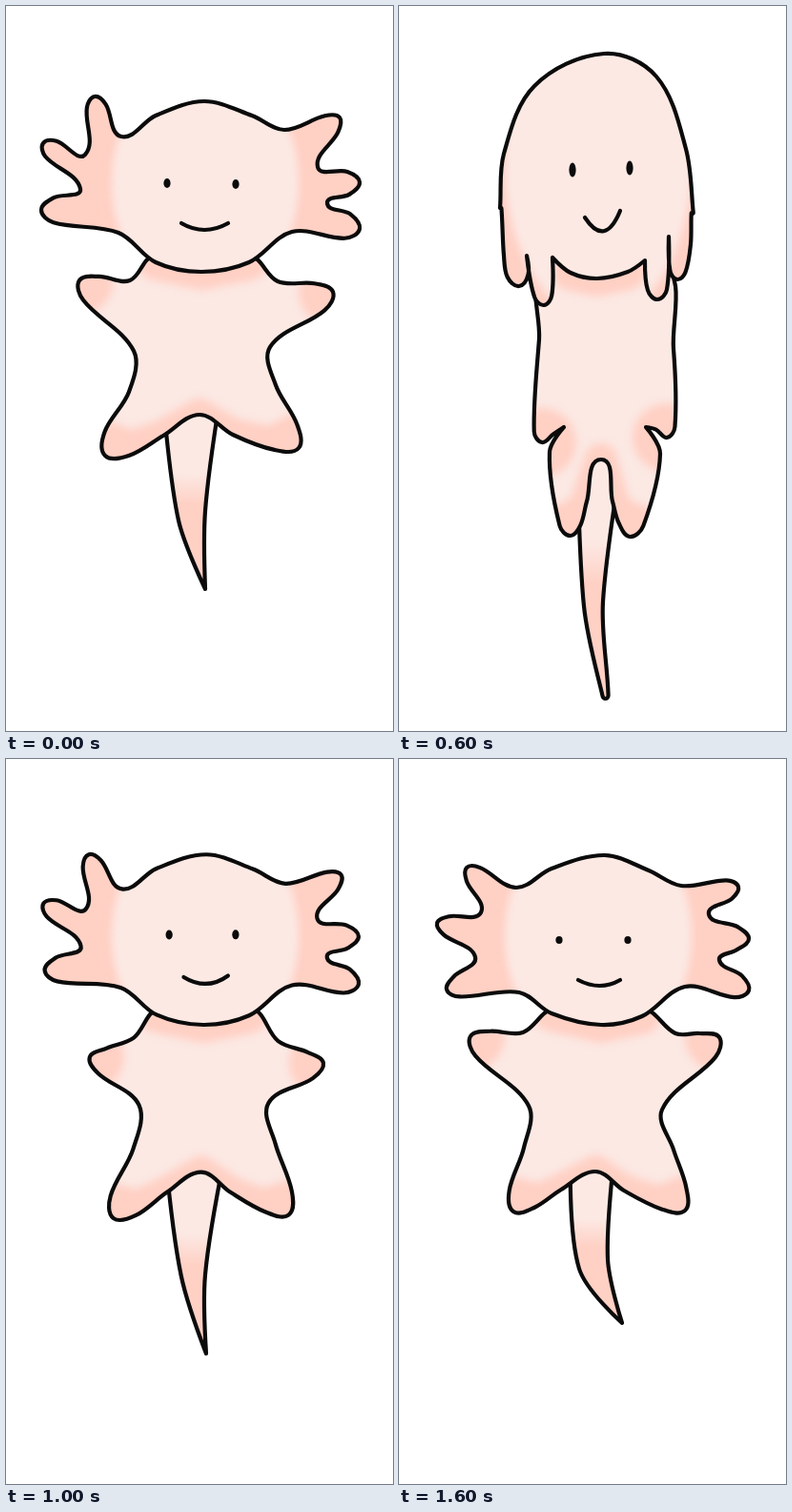
Write an HTML page with a canvas that moves like this. It is 406 by 761 pixels and loops after 1.8 s.

```html
<!DOCTYPE html>
<html lang="en">
<head>
<meta charset="utf-8">
<title>Stretching axolotl</title>
<style>
  html, body { margin: 0; width: 100%; height: 100%; overflow: hidden; background: #fff; }
  canvas { display: block; }
</style>
</head>
<body>
<canvas width="406" height="761"></canvas>
<script>
const ctx = document.querySelector('canvas').getContext('2d');
const INK = '#0b0b0b', SKIN = '#fce9e4', BLUSH = '#ffd0c4';
const HOLD = 200;

// Outlines run clockwise. [x, y] is a smooth knot, [x, y, r] a fingertip
// rounded with radius r, [x, y, 0] a sharp corner.
// head: top, brow, valley, three fingers, jaw, chin, and back up the left side
// body: neck, shoulder, hand, armpit, waist, foot, thigh, crotch, and back up
const relaxed = {
  head: [[208,100], [258,115], [292,130], [350,117,11], [327,169], [371,185,12], [337,207], [371,234,13],
    [300,237], [255,269], [205,279], [157,269], [118,238],
    [37,214,13], [78,192], [39,144,10], [83,156], [93,95,10], [121,137], [157,115]],
  body: [[256,262], [285,289], [343,300,15], [277,358], [283,398], [307,464,18], [238,450], [203,429],
    [165,451], [104,472,18], [129,405], [134,362], [77,288,15], [130,288], [155,262]],
  tail: [[224,415,0], [209,530], [209,612,0], [181,540], [165,415,0]],
  eyes: [[169,186], [241,187]], eyeHeight: 5,
  mouth: [[184,228], [208,242], [233,228]]
};

const squashed = {
  head: [[216,101], [262,117], [296,133], [356,134,10], [325,163], [367,189,12], [336,211], [367,243,12],
    [300,239], [255,270], [212,279], [160,267], [126,245],
    [50,242,11], [80,208], [40,172,10], [86,161], [71,114,10], [123,135], [160,115]],
  body: [[257,262], [290,288], [336,292,15], [276,368], [288,410], [300,474,17], [236,453], [206,433],
    [170,452], [120,475,16], [131,408], [136,364], [75,291,15], [130,287], [162,262]],
  tail: [[226,415,0], [219,525], [234,592,0], [189,535], [180,415,0]],
  eyes: [[168,190], [240,190]], eyeHeight: 4,
  mouth: [[188,232], [211,244], [232,232]]
};

const stretched = {
  head: [[217,72], [280,94], [306,131], [344,198,10], [311,183], [336,240,10], [301,220], [303,273,8],
    [285,248], [258,264], [212,277], [165,272], [150,264],
    [136,285,6], [127,249], [98,274,7], [111,214], [72,250,8], [112,152], [140,100]],
  body: [[262,260], [285,318], [306,380,10], [271,366,0], [279,415], [268,518,17], [229,468], [208,446],
    [178,466], [132,511,14], [146,420], [155,366,0], [121,387,10], [146,307], [172,262]],
  tail: [[243,435,0], [209,575], [213,661,0], [192,550], [175,435,0]],
  eyes: [[178,178], [241,175]], eyeHeight: 5.5,
  mouth: [[194,225], [217,250], [232,219]]
};

const longest = {
  head: [[215,50], [270,74], [301,150], [308,218,1], [306,250], [292,287,8], [283,242,0], [271,308,10],
    [258,267,0], [240,279], [208,286], [180,280], [161,264,0],
    [152,314,9], [134,262,0], [126,294,11], [110,262], [106,212,1], [110,155], [142,84]],
  body: [[276,268], [288,360], [281,453,10], [259,442,0], [274,470], [242,557,13], [224,520], [212,476],
    [197,520], [180,556,11], [158,468], [173,442,0], [150,458,10], [147,350], [155,268]],
  tail: [[236,460,0], [214,625], [217,727,3], [194,630], [187,460,0]],
  eyes: [[182,172], [242,170]], eyeHeight: 7.5,
  mouth: [[195,222], [216,254], [232,215]]
};

// Blends numbers, lists or whole poses
function mix(a, b, k) {
  if (typeof a === 'number') return a + (b - a) * k;
  if (Array.isArray(a)) return a.map((v, i) => mix(v, b[i], k));
  return Object.fromEntries(Object.keys(a).map(key => [key, mix(a[key], b[key], k)]));
}

const settled = { ...mix(relaxed, squashed, .15), head: mix(relaxed.head, squashed.head, .55), tail: relaxed.tail };
const returning = {
  ...stretched,
  head: stretched.head.map(([x, y, ...r]) => [x - 1.5, y - 2.5, ...r]),
  mouth: [[192,230], [217,248], [233,224]]
};

const poses = [
  relaxed,
  stretched,
  { ...mix(stretched, longest, .65), head: mix(stretched.head, longest.head, .85) },
  longest,
  returning,
  { ...mix(settled, returning, .25), head: mix(relaxed.head, settled.head, .5) },
  settled,
  mix(settled, squashed, .7),
  squashed
];

// Expands a fingertip into three knots around its rounded end
function roundTip([x, y, r], before, after) {
  const dx = x - (before[0] + after[0]) / 2, dy = y - (before[1] + after[1]) / 2;
  const len = Math.hypot(dx, dy), u = dx / len * r, v = dy / len * r;
  return [[x - u + v, y - v - u], [x, y], [x - u - v, y - v + u]];
}

function outline(points) {
  const near = (list, i) => list[(i + list.length) % list.length];
  const knots = points.flatMap((p, i) =>
    p[2] > 0 ? roundTip(p, near(points, i - 1), near(points, i + 1)) : [p]);
  const heading = i => {
    if (knots[i].length > 2) return [0, 0];
    const [ax, ay] = near(knots, i - 1), [bx, by] = near(knots, i + 1);
    const len = Math.hypot(bx - ax, by - ay) || 1;
    return [(bx - ax) / len, (by - ay) / len];
  };
  const path = new Path2D();
  path.moveTo(...knots[0]);
  knots.forEach(([x, y], i) => {
    const j = (i + 1) % knots.length, [ex, ey] = knots[j];
    const [ux, uy] = heading(i), [vx, vy] = heading(j);
    const reach = Math.hypot(ex - x, ey - y) / 3;
    path.bezierCurveTo(x + ux * reach, y + uy * reach, ex - vx * reach, ey - vy * reach, ex, ey);
  });
  path.closePath();
  return path;
}

function part(points, fill, shade = () => {}) {
  const path = outline(points);
  ctx.fillStyle = fill;
  ctx.fill(path);
  ctx.save();
  ctx.clip(path);
  ctx.filter = 'blur(4px)';
  shade();
  ctx.restore();
  ctx.stroke(path);
}

function line(points, color, width) {
  ctx.strokeStyle = color;
  ctx.lineWidth = width;
  ctx.beginPath();
  ctx.moveTo(points[0][0], points[0][1]);
  for (const [x, y] of points) ctx.lineTo(x, y);
  ctx.stroke();
}

function oval(x, y, rx, ry, color) {
  ctx.fillStyle = color;
  ctx.beginPath();
  ctx.ellipse(x, y, rx, ry, 0, 0, 2 * Math.PI);
  ctx.fill();
}

function draw({ head, body, tail, eyes, eyeHeight, mouth }) {
  ctx.fillStyle = '#fff';
  ctx.fillRect(0, 0, 406, 761);
  ctx.strokeStyle = INK;
  ctx.lineWidth = 4.2;
  ctx.lineCap = ctx.lineJoin = 'round';

  const fade = ctx.createLinearGradient(0, tail[0][1], 0, tail[2][1]);
  fade.addColorStop(.38, SKIN);
  fade.addColorStop(.55, BLUSH);
  part(tail, fade);

  part(body, SKIN, () => {
    line(head.slice(9, 12), BLUSH, 38);
    line(body.slice(5, 10), BLUSH, 34);
    for (const limb of [2, 5, 9, 12]) oval(body[limb][0], body[limb][1], 36, 36, BLUSH);
  });

  const top = head[0][1], chin = head[10][1];
  part(head, BLUSH, () => oval(209, (top + chin) / 2 - 4, 98, (chin - top) * .7, SKIN));

  for (const [x, y] of eyes) oval(x, y, 3.6, eyeHeight, INK);
  ctx.beginPath();
  ctx.moveTo(...mouth[0]);
  ctx.quadraticCurveTo(...mouth[1], ...mouth[2]);
  ctx.stroke();
}

let shown = -1;
function tick() {
  const index = Math.floor(performance.now() / HOLD) % poses.length;
  if (index !== shown) draw(poses[shown = index]);
  requestAnimationFrame(tick);
}
tick();
</script>
</body>
</html>
```
